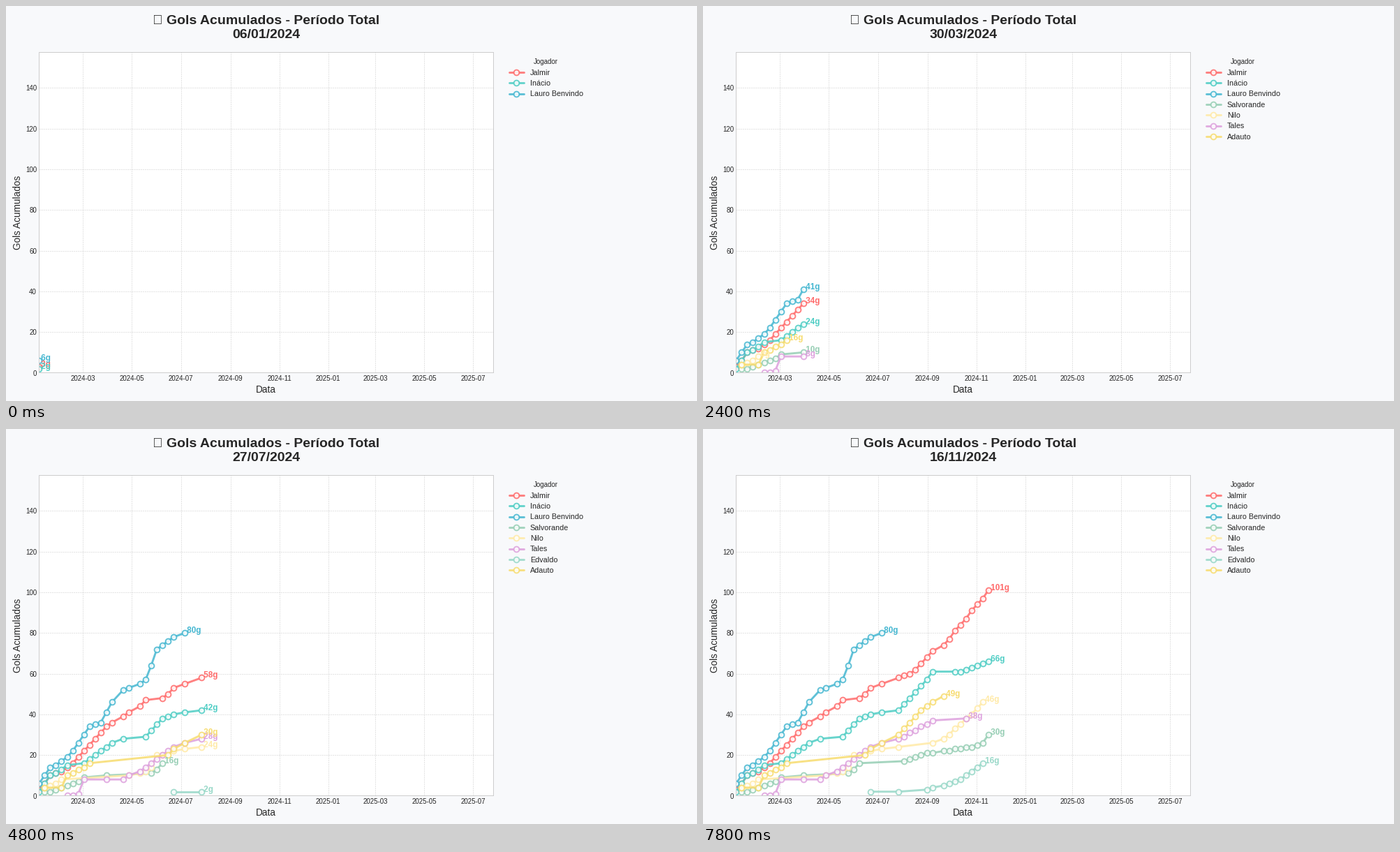
A matplotlib script for the animation above (8000 ms loop, 990 px wide and 566 px high).

```python
import matplotlib.pyplot as plt
import matplotlib.dates as mdates
import numpy as np
from matplotlib.animation import FuncAnimation

plt.rcParams.update({
    "font.family": "Liberation Sans",
    "text.color": "0.15",
    "axes.labelcolor": "0.15",
    "xtick.color": "0.15",
    "ytick.color": "0.15",
    "lines.solid_capstyle": "round",
})

FRAMES, INTERVAL = 40, 200
LAST_WEEK = 81
OFF_WEEKS = {14, 17, 25, 27, 28, 36}
MIN_PACE = 0.45  # a slower stretch means the player was absent

start = np.datetime64("2024-01-06")
weeks = [w for w in range(46) if w not in OFF_WEEKS]
dates = start + 7 * np.array(weeks)

fig = plt.figure(figsize=(14.14286, 8.08572), dpi=70, facecolor="#f8f9fb")
ax = fig.add_axes([47.36 / 990, 40.5 / 566, 650.75 / 990, 459.2 / 566])
ax.set_facecolor("white")
ax.set_xlim(start, start + 7 * LAST_WEEK)
ax.set_ylim(0, 157.5)
ax.xaxis.set_major_locator(mdates.MonthLocator(bymonth=range(1, 12, 2)))
ax.xaxis.set_major_formatter(mdates.DateFormatter("%Y-%m"))
ax.set_yticks(range(0, 141, 20))
ax.tick_params(length=0, pad=3.5, labelsize=10)
ax.grid(True, color="0.8", linestyle="--", linewidth=0.6, alpha=0.9)
ax.set_axisbelow(True)
for spine in ax.spines.values():
    spine.set(color="0.8", linewidth=1)
ax.set_xlabel("Data", fontsize=14)
ax.set_ylabel("Gols Acumulados", fontsize=14)


def season(*keys):
    """Rounds played and running totals, filled in between (round, goals) keys."""
    key_rounds, key_goals = zip(*keys)
    path = np.interp(np.arange(FRAMES), key_rounds, key_goals)
    pace = np.diff(path, prepend=path[0])
    rounds = np.array([r for r in range(FRAMES)
                       if r in key_rounds or pace[r] > MIN_PACE])
    return rounds, np.floor(path[rounds] + 1e-6).astype(int)


class Player:
    def __init__(self, name, color, *keys):
        self.rounds, self.goals = season(*keys)
        self.line, = ax.plot([], [], color=color, label=name, linewidth=3,
                             alpha=0.85, marker="o", markersize=8,
                             markerfacecolor="white", markeredgecolor=color,
                             markeredgewidth=2)
        self.tag = ax.text(start, 0, "", color=color, fontsize=12,
                           fontweight="bold")

    def show(self, now):
        """Draw the season up to round now; False before the first match."""
        n = np.count_nonzero(self.rounds <= now)
        days, goals = dates[self.rounds[:n]], self.goals[:n]
        self.line.set_data(days, goals)
        self.tag.set_text(f" {goals[-1]}g" if n else "")
        if n:
            self.tag.set_position((days[-1], goals[-1]))
        return n > 0


players = [
    Player("Jalmir", "#FF6B6B", (0, 3), (2, 10), (5, 14), (12, 34), (17, 47),
           (20, 48), (24, 58), (27, 62), (33, 81), (39, 101)),
    Player("Inácio", "#4ECDC4", (0, 2), (2, 10), (5, 15), (8, 16), (14, 28),
           (17, 29), (20, 38), (24, 42), (30, 61), (33, 61), (39, 66)),
    Player("Lauro Benvindo", "#45B7D1", (0, 6), (2, 14), (5, 19), (9, 34),
           (11, 36), (14, 52), (17, 57), (19, 72), (23, 80)),
    Player("Salvorande", "#96CEB4", (1, 2), (5, 5), (8, 9), (12, 10),
           (18, 11), (20, 16), (25, 17), (29, 21), (33, 23), (38, 26), (39, 30)),
    Player("Nilo", "#FFEAA7", (1, 4), (4, 8), (15, 10), (18, 14), (19, 20),
           (24, 24), (30, 26), (33, 33), (38, 46)),
    Player("Tales", "#DDA0DD", (5, 0), (7, 1), (8, 8), (12, 8), (14, 8),
           (18, 16), (24, 28), (30, 37), (35, 38)),
    Player("Edvaldo", "#98D8C8", (22, 2), (24, 2), (29, 3), (33, 7), (38, 16)),
    Player("Adauto", "#F7DC6F", (1, 4), (4, 4), (5, 10), (9, 16), (21, 20),
           (24, 30), (28, 42), (31, 49)),
]


def update(i):
    shown = [p.line for p in players if p.show(i)]
    day = "/".join(reversed(str(dates[i]).split("-")))
    # the trophy has no glyph in this font and shows as an empty box
    ax.set_title(f"\U0001F3C6 Gols Acumulados - Período Total\n{day}",
                 fontsize=20, fontweight="bold", pad=21, linespacing=1.22)
    ax.legend(handles=shown, title="Jogador", loc="upper left",
              bbox_to_anchor=(1.02, 1.0015), fontsize=11, title_fontsize=10,
              frameon=False)
    return []


anim = FuncAnimation(fig, update, frames=FRAMES, interval=INTERVAL,
                     repeat=True, repeat_delay=0)
plt.show()
```
